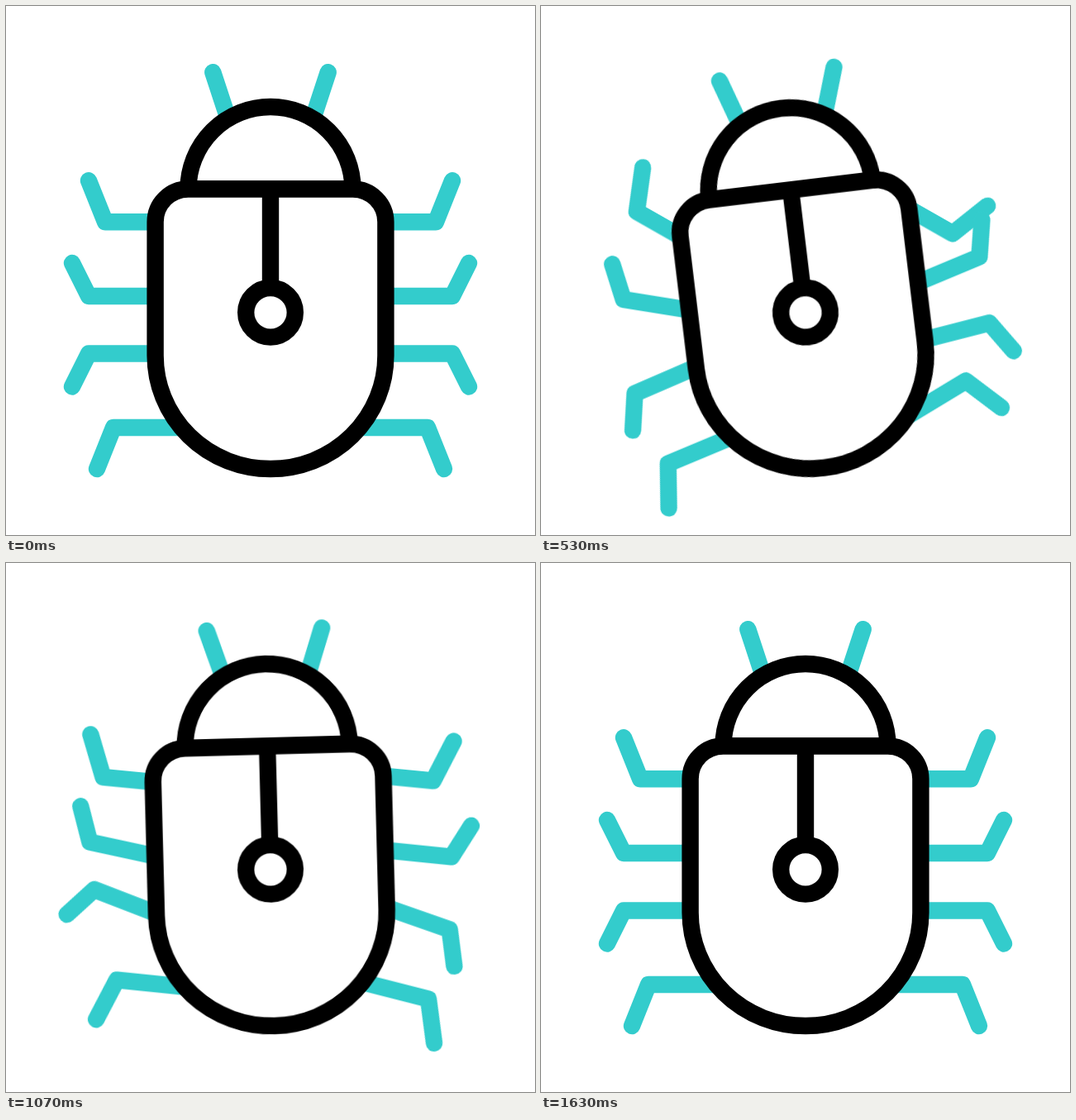
An HTML page that plays this animation: 640x640 px, repeating every 1670 ms.

```html
<!DOCTYPE html>
<html lang="en">
<head>
<meta charset="utf-8">
<title>Bug</title>
<style>
  html, body { margin: 0; width: 100%; height: 100%; overflow: hidden; background: #fff; }
  svg { display: block; width: 100%; height: 100%; }
  path, circle { fill: #fff; stroke: #000; stroke-width: 20.4; stroke-linejoin: round; }
  .limb { fill: none; stroke: #3cc; stroke-linecap: round; }
  #bug { transform-origin: 320px 370.8px; }
</style>
</head>
<body>
<svg viewBox="0 0 640 640">
  <g id="bug">
    <g id="legs"></g>
    <path class="limb" d="M250.3 80.2 267 131M389.7 80.2 373 131"/>
    <path d="M220.5 221.5a99.5 99.5 0 0 1 199 0z"/>
    <path d="M220.4 221.5H419.6a39.8 39.8 0 0 1 39.8 39.8V423a139.4 137 0 0 1-278.8 0V261.3a39.8 39.8 0 0 1 39.8-39.8z"/>
    <path d="M320 221.5V342"/>
    <circle cx="320" cy="370.8" r="29.8"/>
  </g>
</svg>
<script>
const LOOP = 1670, STEPS = 50, MIDDLE = 320;
const startOf = step => Math.round(step * 10 / 3) * 10;

// Cubic curve through [step, degrees] keys; flat keys ease in and out.
function curve(keys, flat) {
  const last = keys.length - 1;
  const slope = i => {
    if (flat || i === 0 || i === last) return 0;
    const [a, b] = [keys[i - 1], keys[i + 1]];
    return (b[1] - a[1]) / (b[0] - a[0]);
  };
  return step => {
    if (step >= keys[last][0]) return keys[last][1];
    const i = keys.findIndex(key => key[0] > step) - 1;
    const [t0, v0] = keys[i], [t1, v1] = keys[i + 1];
    const d = t1 - t0, p = (step - t0) / d, q = 1 - p;
    return v0 * q * q * (1 + 2 * p) + v1 * p * p * (3 - 2 * p)
      + d * p * q * (slope(i) * q - slope(i + 1) * p);
  };
}

function swing(el, angleAt) {
  const frames = Array.from({ length: STEPS }, (_, step) => ({
    offset: startOf(step) / LOOP,
    transform: `rotate(${angleAt(step).toFixed(2)}deg)`,
    easing: 'step-end'
  }));
  frames.push({ offset: 1, transform: frames[0].transform });
  el.animate(frames, { duration: LOOP, iterations: Infinity });
}

// Half the shell's width: straight sides, then a round end.
function shellAt(y) {
  const drop = Math.max(0, y - 423) / 137;
  return 139.4 * Math.sqrt(1 - drop * drop);
}

// Each leg strikes its own five poses; all share the start, the late dip and the return.
const stride = ([a, b, c, d, e]) => curve([
  [0, 0], [10, a], [16, b], [22, c], [32, d], [36.5, -14], [41, e], [48, 6.5], [49, 0]
]);

function addLeg(side, y, reach, rise, angleAt) {
  const x = out => MIDDLE + side * out;
  const hip = x(shellAt(y));
  const leg = document.createElementNS('http://www.w3.org/2000/svg', 'path');
  leg.setAttribute('class', 'limb');
  leg.setAttribute('d', `M${x(reach + 20)} ${y + rise}L${x(reach)} ${y}H${hip}`);
  leg.style.transformOrigin = `${hip}px ${y}px`;
  document.getElementById('legs').append(leg);
  swing(leg, angleAt);
}

function addPair(y, reach, rise, left, right) {
  addLeg(-1, y, reach, rise, left);
  addLeg(1, y, reach, rise, right);
}

const lively = stride([-18.6, 36.5, -11, 7, 18]);
const calm = stride([0, -15.8, 15.6, 7.3, 2.7]);

addPair(261.3, 200, -50, lively, lively);
addPair(351, 220, -40, stride([-21.4, 16, 3.7, 13.7, 15]), calm);
addPair(420.5, 220, 40, stride([-4.8, -16.5, 27, 22.6, 9.8]), stride([-8.5, -7.5, 20.8, 20.8, 11]));
addPair(510, 190, 50, calm, stride([0, -24.3, 33, 15.8, 6]));

swing(document.getElementById('bug'), curve(
  [[0, 0], [12.3, -12.5], [24.2, 12], [36, -6.4], [44.3, 0]], true));
</script>
</body>
</html>
```
